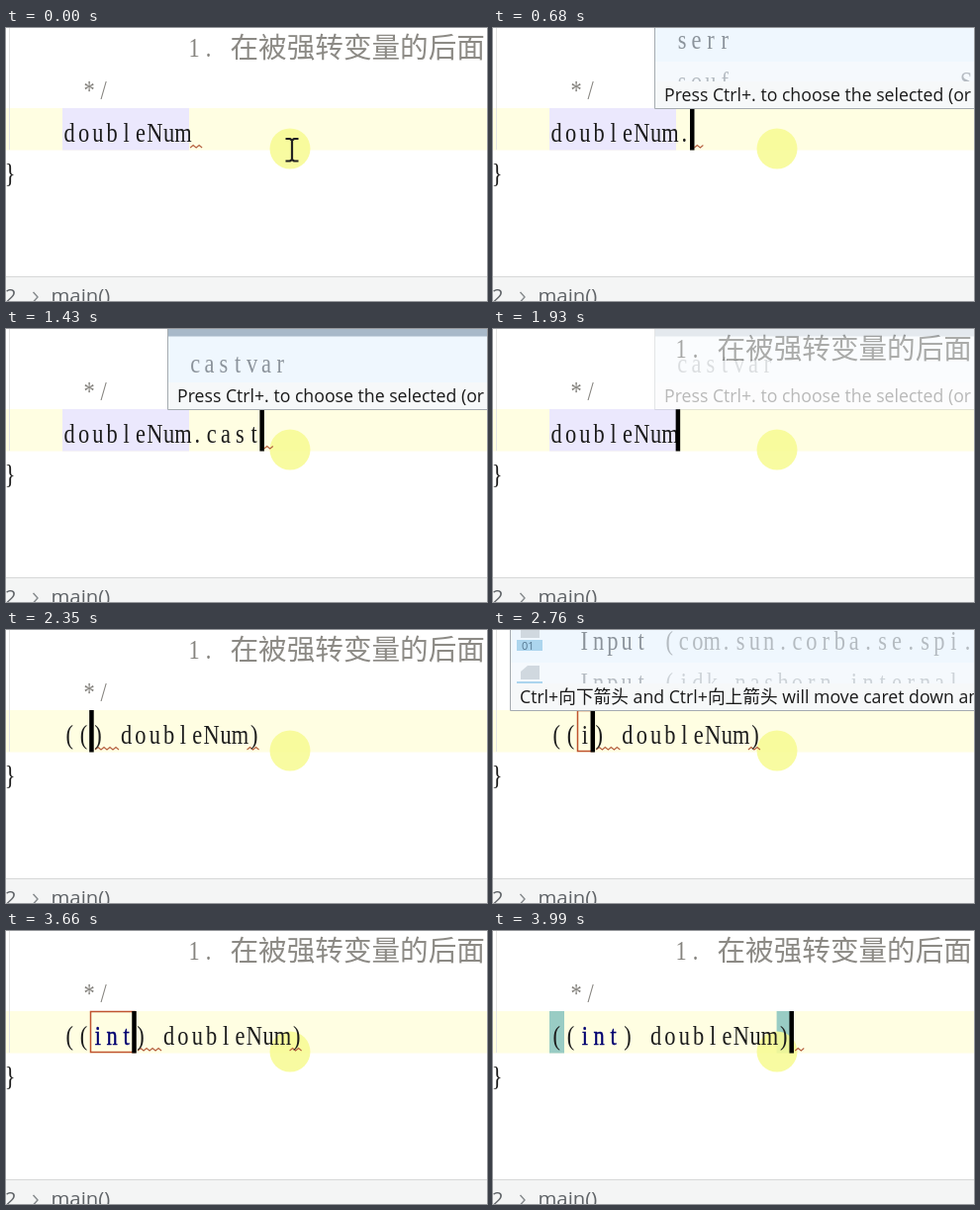
Animation, 486 px wide and 276 px high, one loop 4910 ms. Source, as an HTML page:

```html
<!DOCTYPE html>
<html lang="zh">
<head>
<meta charset="utf-8">
<title>Editor cast completion</title>
<style>
  html, body { margin: 0; width: 100%; height: 100%; overflow: hidden; background: #fff; }
  svg { display: block; width: 486px; height: 276px; }
  text { white-space: pre; }
  .mono { font: 28px "Liberation Serif", serif; text-anchor: middle; fill: #1c1c1c; }
  .note { fill: #85837e; }
  .cjk { font: 300 28.6px "Noto Sans CJK SC", "Noto Sans CJK", sans-serif; fill: #8c8a85; }
  .ui { font: 20.3px "Open Sans", "Noto Sans", sans-serif; fill: #606468; }
  .hint { font: 17.7px "Open Sans", "Noto Sans CJK SC", "Noto Sans CJK", sans-serif; fill: #1a1a1a; }
  .item { fill: #8b939b; }
  .tail { fill: #b4bbc1; }
  .key { fill: #000070; stroke: #000070; stroke-width: .4; }
  .wave { fill: none; stroke: #b5603f; stroke-width: 1.1; }
</style>
</head>
<body>
<svg viewBox="0 0 486 276">
  <rect width="486" height="276" fill="#fff"/>
  <rect y="81" width="486" height="42.5" fill="#fffee2"/>
  <path d="M3.5 0V123" stroke="#e4e4e4"/>
  <rect y="251" width="486" height="25" fill="#f4f5f5"/>
  <path d="M0 251.5H486" stroke="#d6d8d8"/>
  <text class="ui" x="-1" y="278">2</text>
  <path d="M27.500 267l4.500 5-4.500 5" fill="none" stroke="#85898c" stroke-width="1.400"/>
  <text class="ui" x="45.500" y="278">main()</text>
  <g id="scene"></g>
</svg>
<script>
const LOOP = 4910, CELL = 14.35, LEFT = 57, CONDENSE = .8;
const scene = document.getElementById('scene');
const colX = col => LEFT + col * CELL;

const rect = (x, y, w, h, fill, extra = '') =>
  `<rect x="${x}" y="${y}" width="${w}" height="${h}" fill="${fill}" ${extra}/>`;

// Condensed serif glyphs, each centred in its own terminal cell
function mono(x, y, str, { cls = '', extra = '', html = str } = {}) {
  const centres = Array.from(str, (_, i) => ((i + .5) * CELL / CONDENSE).toFixed(2)).join(' ');
  return `<text class="mono ${cls}" transform="translate(${x} ${y}) scale(${CONDENSE} 1)" x="${centres}" ${extra}>${html}</text>`;
}

function wave(x, width) {
  let d = `M${x} 121`;
  for (let i = 1; i * 3 <= width; i++) d += `L${x + i * 3} ${i % 2 ? 118.5 : 121}`;
  return `<path class="wave" d="${d}"/>`;
}

// Icons of the completion rows
const fileIcon = y => `<path d="M28 ${y - 12}v-8l7-6h12v14z" fill="#d0d8df"/>` +
  rect(24, y - 10, 26, 11, '#acd5ee') +
  `<text x="29" y="${y - .5}" font-family="Open Sans, sans-serif" font-size="11" fill="#55768f">01</text>`;
const typeIcon = y => `<circle cx="37" cy="${y - 12}" r="12.500" fill="#bfe3c5"/>` +
  `<text x="34" y="${y - 7}" font-family="Liberation Serif, serif" font-size="14" fill="#66856c">I</text>` +
  `<path d="M57.500 ${y - 11}v-4a3 3 0 0 1 6 0v4" fill="none" stroke="#9bd0a7" stroke-width="2"/>` +
  rect(61, y - 13, 10, 8, '#9bd0a7');

const SHORT = 'Press Ctrl+. to choose the selected (or';
const LONG = 'Ctrl+向下箭头 and Ctrl+向上箭头 will move caret down and';

const popups = {
  postfix: { x: 163, textX: 184, first: 21, rows: ['serr', 'souf                S'], hint: SHORT },
  cast: { x: 163, textX: 184, first: 44, rows: ['castvar'], hint: SHORT, header: true },
  input: { x: 17, textX: 85, first: 20, icon: fileIcon, hint: LONG,
    rows: ['Input (com.sun.corba.se.spi.orb)', 'Input (jdk.nashorn.internal.dev)'] },
  types: { x: 17, textX: 85, first: 20, icon: typeIcon, hint: LONG,
    rows: ['IntPredicate (java.util.function)', 'IntStream (java.util.stream)'] }
};

function popup({ x, textX, first, rows, hint, header, icon }, opacity) {
  let s = rect(x, 0, 486 - x, 81, '#f5f9fd') + rect(x, 0, 486 - x, first + 13, '#eff7fe');
  if (header) s += rect(x, 0, 486 - x, 7.5, '#a8b9c9');
  rows.forEach((row, i) => {
    const y = first + i * 42;
    const html = row.replace(/\(.*/, '<tspan class="tail">$&</tspan>');
    s += (icon ? icon(y) : '') + mono(textX, y, row, { cls: 'item', html, extra: `opacity="${i ? .6 : 1}"` });
  });
  s += rect(x, 54, 486 - x, 27, '#f6f8f9') +
    `<text class="hint" x="${x + 10}" y="74">${hint}</text>` +
    `<path d="M${x + .5} 0V81.500H486" fill="none" stroke="#a5abb0"/>`;
  return `<g opacity="${opacity}">${s}</g>`;
}

const beam = '<path d="M282.500 112h4.500l2 1.500 2-1.500h4.500M289 113v20M282.500 134.500h4.500l2-1.500 2 1.500h4.500" ' +
  'fill="none" stroke="#222" stroke-width="2.200"/>';

// Each step changes only the named parts of the editor state; waves are [column, width in px]
const steps = [
  [0, { code: 'doubleNum', caret: null, waves: [[9, 12]], mark: true, beam: true, pop: null, fade: 1, box: 0, match: false }],
  [330, { caret: 9 }],
  [500, { code: 'doubleNum.', caret: 10, waves: [], beam: false }],
  [590, { pop: 'postfix', fade: .6 }],
  [680, { waves: [[10.2, 9]], fade: 1 }],
  [840, { code: 'doubleNum.c', caret: 11, waves: [[11.2, 9]] }],
  [920, { pop: 'cast' }],
  [1090, { code: 'doubleNum.ca', caret: 12, waves: [[12.2, 9]] }],
  [1260, { code: 'doubleNum.cas', caret: 13, waves: [[13.2, 9]] }],
  [1350, { code: 'doubleNum.cast', caret: 14, waves: [] }],
  [1430, { waves: [[14.2, 9]] }],
  [1930, { code: 'doubleNum', caret: 9, waves: [], fade: .3 }],
  [2010, { code: '(() doubleNum)', caret: 2, mark: false, pop: null }],
  [2170, { waves: [[2.3, 24]] }],
  [2260, { waves: [[2.3, 24], [13, 14]] }],
  [2430, { code: '((i) doubleNum)', caret: 3, waves: [] }],
  [2510, { box: 1 }],
  [2590, { waves: [[3.3, 24], [14, 14]] }],
  [2760, { pop: 'input', fade: 1 }],
  [2840, { code: '((in) doubleNum)', caret: 4, box: 2, waves: [[4.3, 24], [15, 14]] }],
  [3000, { code: '((int) doubleNum)', caret: 5, box: 3, waves: [] }],
  [3080, { pop: 'types' }],
  [3160, { waves: [[5.3, 24], [16, 14]] }],
  [3570, { fade: .35 }],
  [3660, { pop: null }],
  [3910, { caret: 17, box: 0, waves: [] }],
  [3990, { match: true, waves: [[17.3, 9]] }]
];

function draw(s) {
  let out = '<text class="cjk" x="226.500" y="30">在被强转变量的后面</text>' +
    mono(183, 29, '1.', { cls: 'note' }) +
    mono(77, 72, '*/', { cls: 'note', extra: 'font-style="italic"' }) +
    mono(-3, 156, '}');
  if (s.mark) out += rect(LEFT, 81, 128, 42.5, '#ebe8fd');
  if (s.match) out += rect(LEFT, 81, 15, 42.5, '#99ccc4') + rect(colX(16), 81, 15, 42.5, '#99ccc4');
  out += '<circle cx="287" cy="122" r="20.500" fill="#f8fb94" opacity=".88"/>';
  out += s.waves.map(([col, width]) => wave(colX(col), width)).join('');
  out += mono(LEFT, 115, s.code, { html: s.code.replace('int)', '<tspan class="key">int</tspan>)') });
  if (s.box) out += rect(85.5, 81.5, s.box * CELL + 1.5, 41, 'none', 'stroke="#c0532f" stroke-width="1.500"');
  if (s.caret !== null) out += rect(colX(s.caret) - 1.5, 81, 4.5, 42.5, '#000');
  if (s.beam) out += beam;
  if (s.pop) out += popup(popups[s.pop], s.fade);
  scene.innerHTML = out;
}

let shown = -1;
function tick() {
  const t = performance.now() % LOOP;
  const count = steps.filter(([start]) => start <= t).length;
  if (count !== shown) {
    shown = count;
    draw(Object.assign({}, ...steps.slice(0, count).map(step => step[1])));
  }
  requestAnimationFrame(tick);
}
tick();
</script>
</body>
</html>
```
